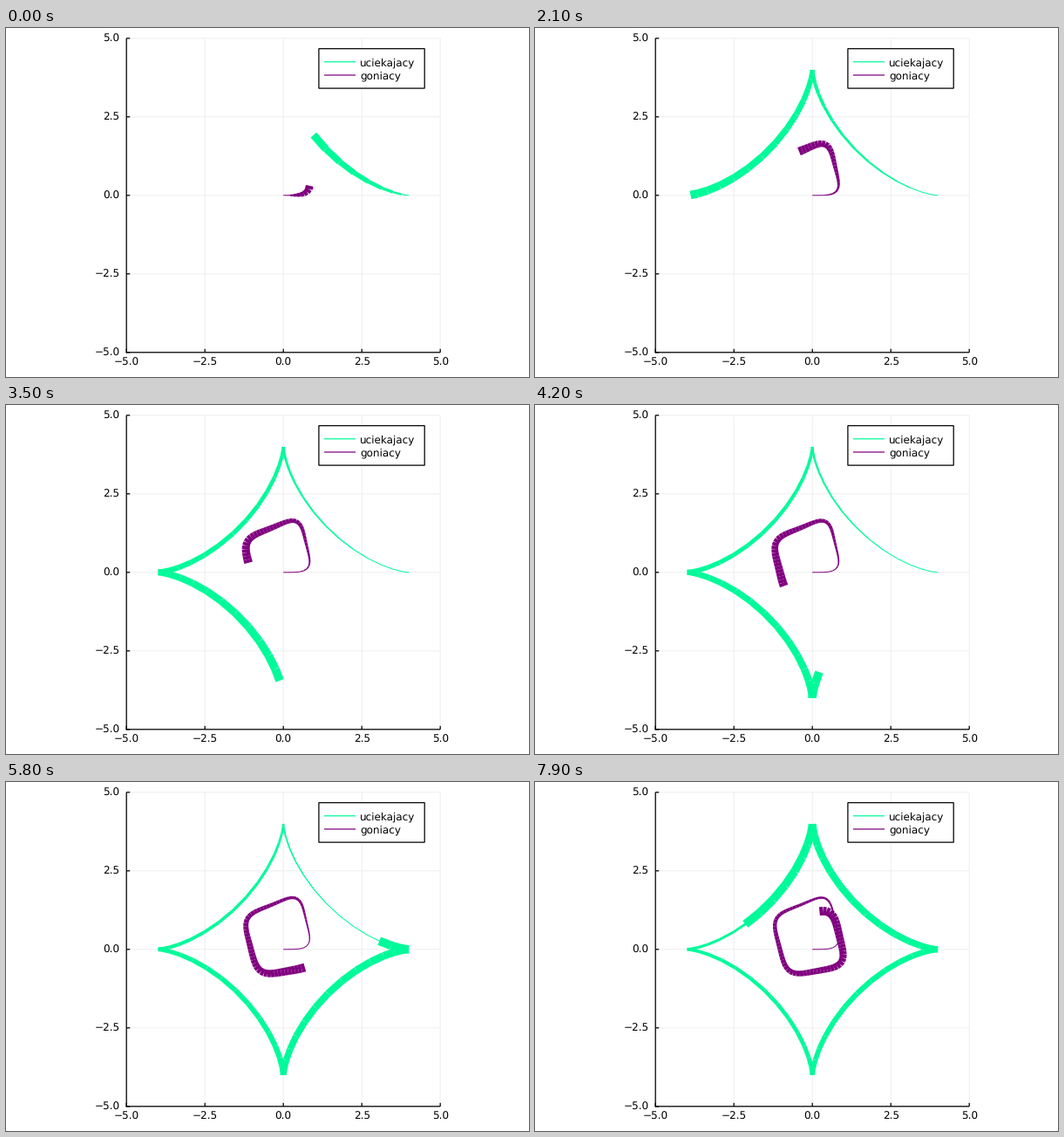
Write a matplotlib script that moves like this. It is 600 by 400 pixels and loops after 8000 ms.

```python
import numpy as np
import matplotlib.pyplot as plt
from matplotlib.animation import FuncAnimation
from matplotlib.collections import LineCollection
from matplotlib.patches import Rectangle

W, H, DPI = 600, 400, 100
FRAMES, INTERVAL = 80, 100
DT, SPEED, SUBSTEPS = 0.1, 1.1, 20
GREEN, PURPLE = "#00fa9a", "#800080"
LEFT, TOP, SIDE = 138.2, 11.8, 360.0
FONT_PX = 12

plt.rcParams["text.hinting"] = "none"


def pt(px):
    return px * 72 / DPI


def to_px(p):
    """Data coordinates (-5..5) to stage pixels."""
    p = np.asarray(p, float)
    return np.stack([LEFT + (p[..., 0] + 5) * SIDE / 10,
                     TOP + (5 - p[..., 1]) * SIDE / 10], axis=-1)


def simulate(count):
    """Runner follows an astroid, chaser always heads straight for it."""
    t = np.arange(count * SUBSTEPS) * DT / SUBSTEPS
    runner = 4 * np.stack([np.cos(t) ** 3, np.sin(t) ** 3], axis=-1)
    chaser = np.zeros_like(runner)
    step = SPEED * DT / SUBSTEPS
    for i in range(len(t) - 1):
        gap = runner[i] - chaser[i]
        chaser[i + 1] = chaser[i] + step * gap / np.hypot(*gap)
    return to_px(runner[::SUBSTEPS]), to_px(chaser[::SUBSTEPS])


fig = plt.figure(figsize=(W / DPI, H / DPI), dpi=DPI, facecolor="white")
ax = fig.add_axes([0, 0, 1, 1])
ax.set(xlim=(0, W), ylim=(H, 0))
ax.axis("off")


def line(x, y, color="black", width=1.25, **kw):
    ax.plot(x, y, color=color, lw=pt(width), solid_capstyle="butt",
            snap=False, **kw)


def label(x, y, text, ha):
    ax.text(x, y, text, ha=ha, va="baseline", fontsize=pt(FONT_PX),
            family="DejaVu Sans", zorder=6)


right, bottom = LEFT + SIDE, TOP + SIDE
for v in np.arange(-5, 5.1, 2.5):
    x, y = to_px((v, v))
    text = f"{v:.1f}".replace("-", "\u2212")
    line([x, x], [TOP, bottom], "#eeeeee", 1, zorder=1)
    line([LEFT, right], [y, y], "#eeeeee", 1, zorder=1)
    line([x, x], [bottom, bottom - 4], zorder=2)
    line([LEFT, LEFT + 4], [y, y], zorder=2)
    label(x, 387, text, "center")
    label(130.5, y + 4.4, text, "right")
line([LEFT, LEFT], [TOP, bottom + 0.6], zorder=2)
line([LEFT - 0.6, right], [bottom, bottom], zorder=2)

ax.add_patch(Rectangle((358.9, 23.7), 121.3, 45.4, fc="white", ec="black",
                       lw=pt(1.25), snap=False, zorder=5))
for y, color, name in [(38.8, GREEN, "uciekajacy"), (54, PURPLE, "goniacy")]:
    line([365, 401], [y, y], color, zorder=6)
    label(406, y + 4.3, name, "left")

runner, chaser = simulate(FRAMES + 9)
trails = []
for path, color, z in [(runner, GREEN, 3), (chaser, PURPLE, 4)]:
    coll = LineCollection([], colors=color, capstyle="butt", zorder=z)
    coll.set_snap(False)
    ax.add_collection(coll, autolim=False)
    trails.append((path, coll))


def update(frame):
    n = frame + 10
    widths = np.maximum(1, 10 * np.arange(n - 1) / (n - 1))
    for path, coll in trails:
        coll.set_segments(np.stack([path[:n - 1], path[1:n]], axis=1))
        coll.set_linewidths(pt(widths))
    return [coll for _, coll in trails]


anim = FuncAnimation(fig, update, frames=FRAMES, interval=INTERVAL,
                     repeat=True, repeat_delay=0)
plt.show()
```
